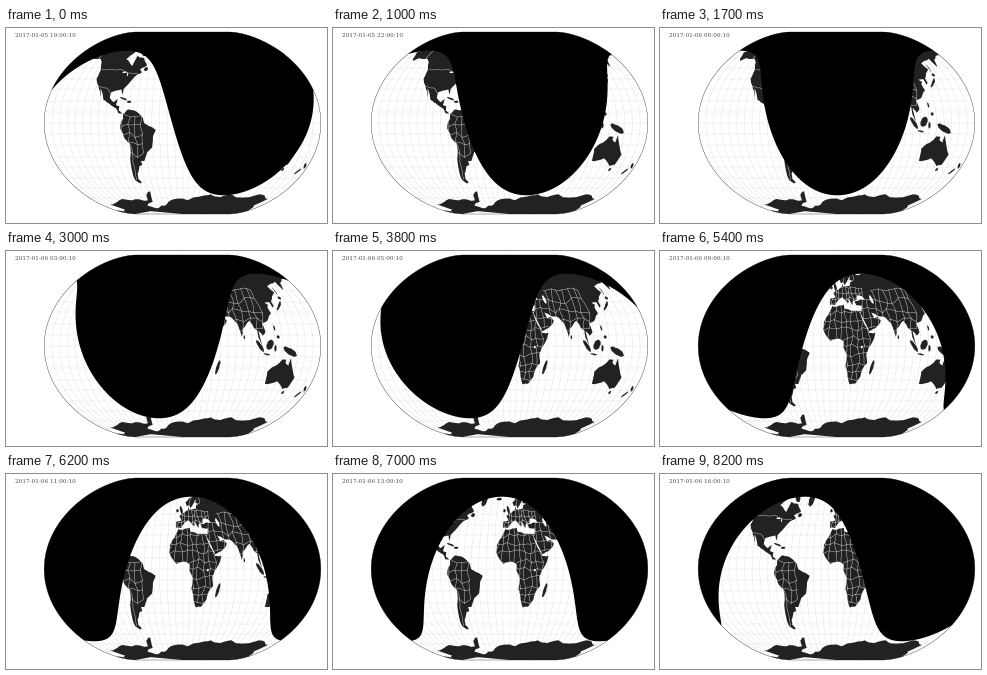
A matplotlib script that plays this animation: 321 px wide and 195 px high, repeating every 8300 ms.

```python
import numpy as np
import matplotlib.pyplot as plt
from matplotlib.animation import FuncAnimation

W, H, DPI = 321, 195, 100
PX = 72 / DPI
CX, CY, RX, RY = 176.5, 95, 138.3, 91
COS1 = RX / RY - 1
DECLINATION = np.radians(-22.5)
INK = "#222222"
rng = np.random.default_rng(4)

# Winkel II: the mean of Mollweide and an equirectangular map
THETA = np.linspace(-np.pi / 2, np.pi / 2, 4001)
PHI = np.degrees(np.arcsin(np.clip((2 * THETA + np.sin(2 * THETA)) / np.pi, -1, 1)))


def project(lon, lat):
    lon, lat = np.clip(lon, -180, 180), np.clip(lat, -90, 90)
    theta = np.interp(lat, PHI, THETA)
    x = lon / 180 * (np.cos(theta) + COS1) / (1 + COS1)
    y = (np.sin(theta) + lat / 90) / 2
    return CX + RX * x, CY - RY * y


def rough(points, rounds=2, amount=0.07):
    """Make a line more ragged by shifting the middle of each segment sideways."""
    for _ in range(rounds):
        step = np.diff(points, axis=0)
        normal = step[:, ::-1] * [-1, 1]
        shift = rng.uniform(-amount, amount, (len(step), 1))
        mid = points[:-1] + step / 2 + normal * shift
        points = np.insert(points, np.arange(1, len(points)), mid, axis=0)
    return points


def land(*coords, color=INK):
    points = np.reshape(coords, (-1, 2)).astype(float)
    ring = rough(np.vstack([points, points[:1]]))
    return ax.fill(*project(*ring.T), color=color, lw=0, zorder=2)[0]


def isle(lon, lat, length, width, tilt=0, color=INK):
    a, t = np.radians(tilt), np.linspace(0, 2 * np.pi, 9)[:-1]
    u, v = length / 2 * np.cos(t), width / 2 * np.sin(t)
    land(*np.column_stack([lon + u * np.cos(a) - v * np.sin(a),
                           lat + u * np.sin(a) + v * np.cos(a)]).ravel(), color=color)


def border(patch, points):
    line, = ax.plot(*project(*rough(np.array(points, float)).T), color="white",
                    lw=0.45 * PX, alpha=0.8, zorder=3)
    line.set_clip_path(patch)


def countries(patch, west, east, south, north, step):
    """Divide a region with a shaken lattice of borders."""
    grid = np.stack(np.meshgrid(np.arange(west, east, step),
                                np.arange(south, north, step)), axis=-1)
    grid = grid + rng.uniform(-0.32, 0.32, grid.shape) * step
    for line in [*grid, *grid.swapaxes(0, 1)]:
        border(patch, line)


fig = plt.figure(figsize=(W / DPI, H / DPI), dpi=DPI, facecolor="white")
ax = fig.add_axes([0, 0, 1, 1])
ax.set(xlim=(0, W), ylim=(H, 0))
ax.axis("off")

# graticule
grid_style = dict(color="#a07878", alpha=0.4, lw=0.25 * PX, zorder=1)
for lon in range(-170, 180, 10):
    top = 90 if lon % 90 == 0 else 80
    lat = np.linspace(-top, top, 90)
    ax.plot(*project(lon + 0 * lat, lat), **grid_style)
for lat in range(-80, 90, 10):
    ax.plot(*project([-180, 180], [lat, lat]), **grid_style)

north_america = land(
    -168, 66, -162, 59, -158, 57, -152, 60, -139, 59.5, -131, 55.5, -124.5, 48,
    -124.3, 40, -117, 32.6, -110, 23, -113, 31, -105.5, 20.5, -95, 16, -87.5, 13,
    -83.5, 8.5, -77.5, 7.5, -83.5, 11, -83.2, 15, -88, 16, -87, 21.5, -91.5, 18.5,
    -97.5, 22, -97.2, 27.5, -84.2, 30, -81, 25.2, -81.4, 30.5, -75.7, 35.5, -70, 41.7,
    -66, 44, -61, 45.6, -65, 49, -56, 52.5, -65, 60, -78, 62.4, -79, 52, -94, 58.8,
    -87, 65, -82, 70, -140, 70)
south_america = land(
    -77.5, 8, -72, 12, -62, 10.7, -51.5, 4.2, -50, 0, -44, -2.7, -35, -6, -39, -13,
    -41, -22, -48, -26, -53.5, -34, -58, -34, -57.5, -38, -62, -39, -67.5, -46,
    -69, -51, -65.2, -54.7, -69, -55.4, -74.5, -52, -73.6, -37, -70.3, -18, -76, -14,
    -81.2, -5, -80, 1, -77.3, 4)
africa = land(
    -6, 35.8, -9.7, 30, -17, 21, -17.5, 14.7, -13, 8.7, -8, 4.4, 4.5, 6.3, 9.5, 4,
    9, -1, 13.5, -9, 11.8, -17, 15, -27, 18.5, -34.3, 25.7, -34, 32.8, -27, 35, -20,
    40.5, -15, 39, -6.5, 46, 2.5, 51.2, 11.8, 43, 11.5, 37.3, 19, 32.6, 29.9, 34, 31.3,
    20, 31.5, 11, 33.7, 10.5, 37, -2, 35.1)
europe = land(
    -9, 43, -9, 37, -2, 36.8, 3, 42, 9, 44, 16, 38, 18, 40, 13, 45, 19.5, 41,
    22.5, 36.5, 23.5, 40.5, 29, 41.2, 31, 46, 37, 45.3, 41.5, 42, 62, 42, 62, 62, 30, 61,
    23, 59, 21, 55, 10.8, 54.3, 10, 57.5, 8.5, 54, 2, 51, -4.7, 48.4, -1.5, 44)
nordic = land(
    62, 55, 62, 69, 40, 66, 34, 66.5, 40, 67.5, 25, 71, 12.5, 66, 5, 61.5, 7, 58,
    11, 59, 13, 55.5, 18, 60, 25, 65.5, 22, 61, 31, 60)
asia = land(
    26, 40, 28, 36.7, 36, 36.5, 34.5, 31, 33, 29.5, 43, 13, 52, 16, 59.5, 22.5, 56, 26,
    51, 24.5, 48, 30, 57, 26.5, 67, 25, 73, 20, 77.5, 8, 80, 15.5, 90, 22.5, 94.3, 16,
    98.5, 14, 99, 8, 103.5, 1.4, 100, 13.5, 105, 9, 109, 12.5, 106, 20, 114, 22.5,
    121.5, 29, 119.5, 35, 122, 37, 118, 39, 125, 39.7, 126.5, 34.5, 129, 36, 128, 40,
    140, 48.5, 136, 54.5, 155, 59.3, 156.7, 51, 162, 58, 180, 63, 180, 69, 61, 69,
    50, 42, 35, 42)
land(114, -23, 115.5, -34, 124, -33.5, 131, -31.5, 138, -35, 143, -38.8, 150, -37.5,
     153.3, -28, 146, -19, 142.5, -10.8, 140.5, -17.5, 136, -15, 136.5, -12, 131, -12,
     128, -15, 122, -18)
land(-160, -77.5, -135, -74.5, -102, -73, -70, -73, -67, -67, -57, -63.3, -62, -74.5,
     -80, -79, -60, -82, -36, -78, -11, -71.2, 32, -69, 52, -66.5, 72, -69.5, 90, -66.5,
     140, -66.5, 168, -71.5, 162, -79, 180, -85, 180, -90, -180, -90, -180, -85, -150, -84)

isle(-79, 21.7, 11, 1.5, -14)       # Cuba
isle(-71, 18.8, 6, 2)               # Hispaniola
isle(-71, 67, 17, 6, -35)           # Baffin
isle(-56, 49, 6, 4)                 # Newfoundland
isle(-44, 65, 16, 10, 90)           # Greenland
isle(-2, 54, 9, 4, 115)             # Britain
isle(-8, 53.3, 4, 3.5)              # Ireland
isle(-18.5, 65, 10, 3)              # Iceland
isle(47, -19, 14, 4, 70)            # Madagascar
isle(80.8, 7.8, 3.5, 2, 90)         # Sri Lanka
isle(101, 0, 15, 4, -45)            # Sumatra
isle(110, -7.4, 9, 1.5, -8)         # Java
isle(114, 1, 11, 8, 40)             # Borneo
isle(121, -2, 6, 3, 90)             # Sulawesi
isle(140.5, -5, 20, 6, -22)         # New Guinea
isle(121.3, 16, 5, 2, 100)          # Luzon
isle(125, 8, 4, 3)                  # Mindanao
isle(136.5, 36, 14, 2.5, 38)        # Honshu
isle(143, 43.4, 4.5, 3)             # Hokkaido
isle(142.8, 50, 8, 1.3, 90)         # Sakhalin
isle(146.6, -42, 3.5, 3)            # Tasmania
isle(175.8, -38.5, 6, 3, -60)       # New Zealand, north
isle(170.5, -43.8, 8, 2.5, 42)      # New Zealand, south

for lake in [(51, 42, 9, 4, 115), (-87, 46, 7, 1.5, 0), (-81.5, 44, 4, 1.5, 120),
             (33, -1, 2.5, 2.5, 0)]:
    isle(*lake, color="white")

border(north_america, [(-123, 49), (-109, 49), (-95, 49), (-83, 46), (-75, 45), (-67, 45)])
border(north_america, [(-141, 70), (-141, 60)])
border(north_america, [(-117, 32.5), (-106, 31.5), (-97, 26)])
border(south_america, [(-70, -18), (-68, -23), (-70, -35), (-72, -52)])
countries(south_america, -79, -50, -28, 12, 9)
countries(africa, -17, 50, -30, 38, 7.5)
countries(europe, -6, 42, 38, 58, 5)
countries(asia, 36, 110, 14, 53, 9)
border(nordic, [(11, 59), (12, 63), (20, 69), (28, 69)])
border(nordic, [(28, 60), (30, 64), (28, 70)])

# rim of the map
edge = np.linspace(-90, 90, 181)
rim_lon = np.repeat([180, -180], edge.size)
ax.fill(*project(rim_lon, np.r_[edge, edge[::-1]]), fill=False, ec="black",
        lw=0.33 * PX, zorder=5)

night, = ax.fill([0, 1, 1], [0, 0, 1], color="black", lw=0, zorder=4)
clock = ax.text(8.8, 9.3, "", family="DejaVu Serif", fontsize=5.8 * PX, color="#505050")

# time steps of 100 ms at which the next hour appears
STARTS = [0, 1, 5, 10, 14, 17, 22, 25, *range(30, 83, 4)]
LONS = np.linspace(-180, 180, 541)


def draw(i):
    hour = 18 + np.searchsorted(STARTS, i, side="right")
    sun = 15 * (12 - hour) + 1.4
    lat = np.degrees(np.arctan(-np.cos(np.radians(LONS - sun)) / np.tan(DECLINATION)))
    side = np.linspace(lat[-1], 90, 120)
    lon = np.r_[LONS, np.repeat([180, -180], side.size)]
    night.set_xy(np.column_stack(project(lon, np.r_[lat, side, side[::-1]])))
    clock.set_text(f"2017-01-{5 + hour // 24:02d} {hour % 24:02d}:00:10")
    return night, clock


anim = FuncAnimation(fig, draw, frames=83, interval=100, repeat=True, repeat_delay=0)
plt.show()
```
